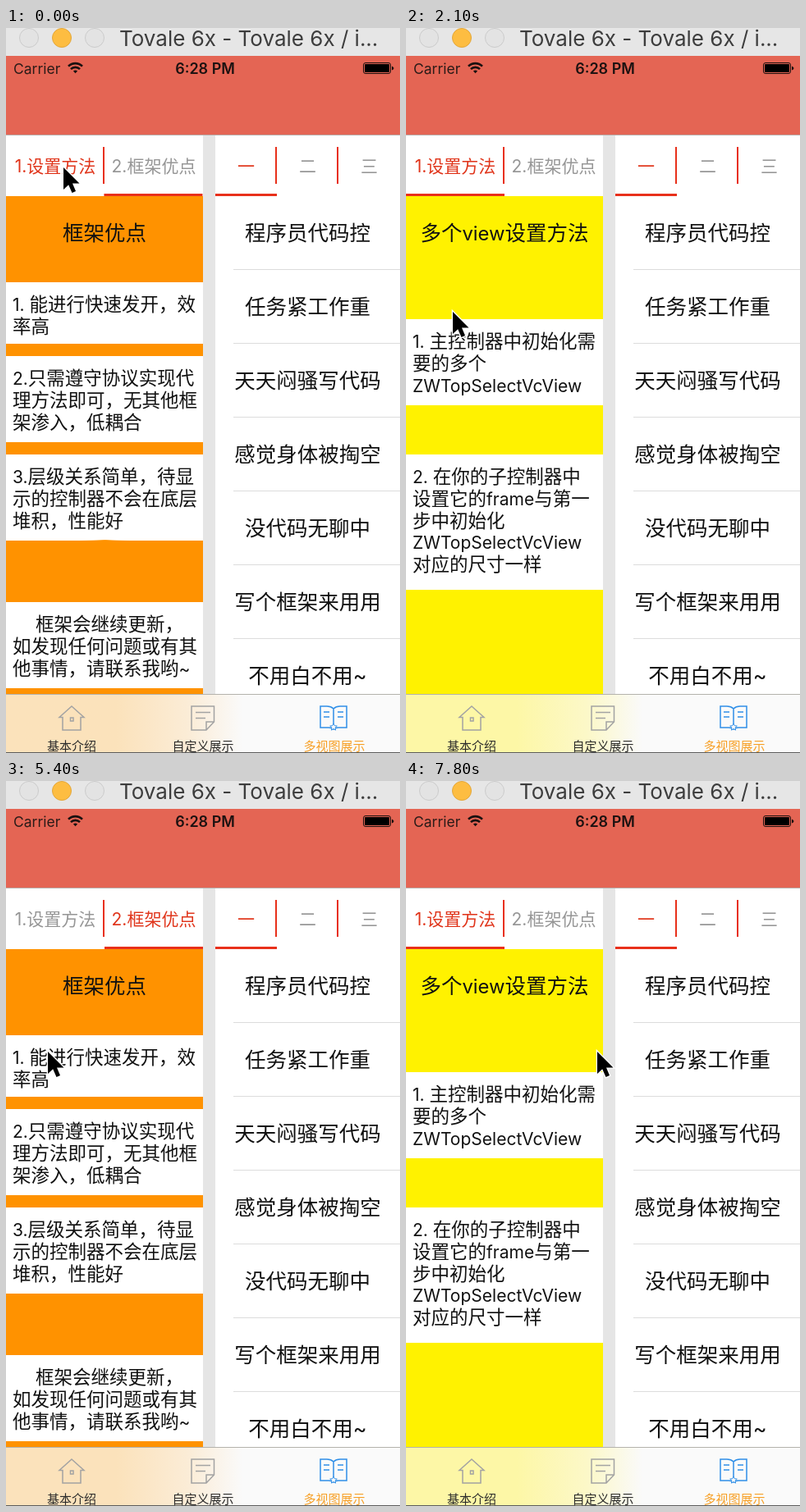
These frames come from a looping animation (480x884 px, 8 s). An HTML page with a canvas:

```html
<!DOCTYPE html>
<html lang="zh-CN">
<head>
<meta charset="utf-8">
<title>多视图展示</title>
<style>
html, body { margin: 0; width: 100%; height: 100%; overflow: hidden; background: #e5e5e5; }
svg, canvas { position: absolute; left: 0; top: 0; display: block; }
canvas { top: 205px; }
text { font-family: Inter, "Noto Sans CJK SC", "Noto Sans CJK JP", "Noto Sans CJK", sans-serif; white-space: pre; }
.mid { text-anchor: middle; }
.tab { font-size: 21px; fill: #969696; }
.tab.on { fill: #e0351b; }
.row { font-size: 25.5px; fill: #111; }
.label { font-size: 15px; fill: #2a2a2a; }
.red { fill: #e8301a; }
.icon { fill: none; stroke: #a3a3a3; stroke-width: 1.5; }
</style>
</head>
<body>
<svg width="480" height="884" viewBox="0 0 480 884">
  <!-- window title -->
  <rect width="480" height="34" fill="#e6e6e6"/>
  <g stroke-width="1" fill="#e3e3e3" stroke="#cbcbcb">
    <circle cx="28" cy="12" r="11.5"/>
    <circle cx="68" cy="12" r="11.5" fill="#fdbd41" stroke="#e3a73a"/>
    <circle cx="108" cy="12" r="11.5"/>
  </g>
  <text x="138" y="22" font-size="26" fill="#3d3d3d">Tovale 6x - Tovale 6x / i...</text>

  <!-- status and navigation bar -->
  <rect y="34" width="480" height="96" fill="#e46554"/>
  <rect y="130" width="480" height="1" fill="#b9aeac"/>
  <text x="9" y="56" font-size="17.5" fill="#2b1b18">Carrier</text>
  <g fill="none" stroke="#1a1110" stroke-width="2.6">
    <path d="M76 46.7a12 12 0 0 1 17 0M79 50.2a7.6 7.6 0 0 1 11 0"/>
    <path d="M81.9 52.6l2.6 2.6 2.6-2.6a4 4 0 0 0-5.2 0z" fill="#1a1110" stroke="none"/>
  </g>
  <text class="mid" x="242.5" y="56" font-size="18" font-weight="600" fill="#1d1211">6:28 PM</text>
  <rect x="435.5" y="42.5" width="33" height="13" rx="2.5" fill="none" stroke="#1a0f0e"/>
  <rect x="437" y="44" width="30" height="10" rx="1" fill="#000"/>
  <path d="M470 46.5q2.5 1 2.5 2.5t-2.5 2.5z" fill="#1a0f0e"/>

  <!-- left tabs -->
  <rect y="131" width="240" height="74" fill="#fff"/>
  <text class="tab mid" x="60" y="175.5">1.设置方法</text>
  <text class="tab mid" x="180" y="175.5">2.框架优点</text>
  <rect class="red" x="118" y="145" width="2" height="45"/>
  <rect class="red" id="line" y="202" width="120" height="3"/>

  <!-- right panel -->
  <rect x="255" y="131" width="225" height="681" fill="#fff"/>
  <text class="tab on mid" x="292.5" y="175.5">一</text>
  <text class="tab mid" x="367.5" y="175.5">二</text>
  <text class="tab mid" x="442.5" y="175.5">三</text>
  <rect class="red" x="328" y="145" width="2" height="45"/>
  <rect class="red" x="403" y="145" width="2" height="45"/>
  <rect class="red" x="255" y="202" width="75" height="3"/>
  <g id="list"></g>
</svg>

<canvas id="page" width="240" height="607"></canvas>

<svg width="480" height="884" viewBox="0 0 480 884">
  <defs>
    <linearGradient id="warm">
      <stop offset=".28" stop-color="#fbe2bb"/><stop offset=".46" stop-color="#fbecd6"/><stop offset=".6" stop-color="#fafafa"/>
    </linearGradient>
    <linearGradient id="sun">
      <stop offset=".28" stop-color="#fdf7a6"/><stop offset=".46" stop-color="#fcf8c8"/><stop offset=".6" stop-color="#fafafa"/>
    </linearGradient>
  </defs>
  <!-- tab bar -->
  <rect y="812" width="480" height="72" fill="url(#sun)"/>
  <rect id="tint" y="812" width="480" height="72" fill="url(#warm)"/>
  <rect y="812" width="480" height="1" fill="#b4b2ac"/>
  <rect y="883" width="480" height="1" fill="#5c5c5c"/>
  <g class="icon">
    <path d="M80 827L95 840.5H91V856H69V840.5H65Z"/>
    <rect x="78.5" y="841" width="3.5" height="4"/>
    <path d="M226 827H253.500V846L244 856H226ZM253.500 846H244V856M231 834.500H249M231 841.500H243"/>
  </g>
  <g class="icon" style="stroke:#2f8fe8">
    <path d="M399 830Q396 827 391 827H383V853H393Q397 853 399 855Q401 853 405 853H415V827H407Q402 827 399 830V849"/>
    <path d="M387 834H394M387 840H394M404 834H411M404 840H411"/>
    <path d="M399 848l1.300 2.700 3 .4-2.200 2 .5 3-2.600-1.500-2.600 1.500.5-3-2.200-2 3-.4z" fill="#fafafa" stroke-width="1"/>
  </g>
  <text class="label mid" x="80" y="880.500">基本介绍</text>
  <text class="label mid" x="240" y="880.500">自定义展示</text>
  <text class="label mid" x="400" y="880.500" style="fill:#f7a026">多视图展示</text>
  <path id="cursor" d="M0 0V27L6.200 21.200 10.500 31 15 29 11 19.500H19.500Z" fill="#000" stroke="#fff" stroke-width="2.600" paint-order="stroke"/>
</svg>

<script>
const LOOP = 8000, STEP = 300, TOP = 205, W = 240, H = 607;
const CJK = '"Noto Sans CJK SC", "Noto Sans CJK JP", "Noto Sans CJK", sans-serif';
const $ = id => document.getElementById(id);
const ease = p => { p = Math.min(1, Math.max(0, p)); return p * p * (3 - 2 * p); };

// Right-hand list
const rows = ['程序员代码控', '任务紧工作重', '天天闷骚写代码', '感觉身体被掏空', '没代码无聊中', '写个框架来用用', '不用白不用~'];
$('list').innerHTML = rows.map((s, i) =>
  `<text class="row mid" x="367.5" y="${259 + i * 90}">${s}</text>` +
  (i < 6 ? `<rect x="277" y="${294 + i * 90}" width="203" height="1" fill="#dcdcdc"/>` : '')).join('');

// Pages: boxes are [top, bottom], lines are [centre y, text, x]
const pages = [
  {
    color: '#fff200', title: '多个view设置方法',
    boxes: [[355, 460], [520, 685]],
    lines: [[381, '1. 主控制器中初始化需'], [408, '要的多个'], [435, 'ZWTopSelectVcView'],
      [546, '2. 在你的子控制器中'], [573, '设置它的frame与第一'], [600, '步中初始化'],
      [626, 'ZWTopSelectVcView'], [653, '对应的尺寸一样']]
  },
  {
    color: '#ff9200', title: '框架优点',
    boxes: [[310, 385], [400, 505], [520, 625], [700, 805]],
    lines: [[336, '1. 能进行快速发开，效'], [363, '率高'],
      [426, '2.只需遵守协议实现代'], [453, '理方法即可，无其他框'], [480, '架渗入，低耦合'],
      [546, '3.层级关系简单，待显'], [573, '示的控制器不会在底层'], [600, '堆积，性能好'],
      [726, '框架会继续更新，', 36], [753, '如发现任何问题或有其'], [780, '他事情，请联系我哟~']]
  }
];

function makeCanvas() {
  const c = document.createElement('canvas');
  c.width = W; c.height = H;
  return c;
}

// Latin runs are set a little smaller than the Chinese ones
function write(g, text, size, x, y, centred) {
  const runs = text.match(/[\x20-\x7e]+|[^\x20-\x7e]+/g).map(s => {
    const latin = s.charCodeAt(0) < 127;
    const font = latin ? `${size * 0.935}px Inter, sans-serif` : `${size}px ${CJK}`;
    g.font = font;
    return { s, font, w: g.measureText(s).width };
  });
  if (centred) x -= runs.reduce((n, r) => n + r.w, 0) / 2;
  for (const r of runs) {
    g.font = r.font;
    g.fillText(r.s, x, y + size * 0.38);
    x += r.w;
  }
}

function drawPage({ color, title, boxes, lines }) {
  const c = makeCanvas(), g = c.getContext('2d');
  g.translate(0, -TOP);
  g.fillStyle = color;
  g.fillRect(0, TOP, W, H);
  g.fillStyle = '#fff';
  for (const [a, b] of boxes) g.fillRect(0, a, W, b - a);
  g.fillStyle = '#111';
  write(g, title, 25.5, 120, 249.5, true);
  for (const [y, s, x = 8] of lines) write(g, s, 22.5, x, y);
  return c;
}

const sheets = pages.map(drawPage);
const view = $('page').getContext('2d');
const mix = makeCanvas().getContext('2d', { willReadFrequently: true });

// Radial shift of the water ring at distance u behind its front
function ring(u) {
  if (u <= 0 || u >= 199) return 0;
  return u < 59 ? 5 * Math.sin(Math.PI * u / 59)
    : -17 * Math.sin(Math.PI * ((u - 59) / 140) ** 0.63);
}

function ripple(front, amp) {
  const src = mix.getImageData(0, 0, W, H).data;
  const out = view.createImageData(W, H), dst = out.data;
  const cx = 120, cy = 426;
  for (let y = 0, i = 0; y < H; y++) for (let x = 0; x < W; x++, i += 4) {
    const dx = x - cx, dy = y - cy, r = Math.hypot(dx, dy) || 1;
    const k = 1 - amp * ring(front - r) / r;
    const sx = Math.min(W - 1.01, Math.max(0, cx + dx * k));
    const sy = Math.min(H - 1.01, Math.max(0, cy + dy * k));
    const x0 = sx | 0, y0 = sy | 0, fx = sx - x0, fy = sy - y0;
    const j = (y0 * W + x0) * 4, d = j + W * 4;
    for (let n = 0; n < 3; n++) {
      const a = src[j + n] + (src[j + 4 + n] - src[j + n]) * fx;
      const b = src[d + n] + (src[d + 4 + n] - src[d + n]) * fx;
      dst[i + n] = a + (b - a) * fy;
    }
    dst[i + 3] = 255;
  }
  view.putImageData(out, 0, 0);
}

// [start time, page shown next]
const switches = [[-20, 0], [4372, 1], [6270, 0]];
// [time, x, y] of the pointer
const track = [[0, 70, 170], [300, 70, 171], [1200, 57, 346], [2100, 57, 346], [3300, 173, 323],
  [3900, 176, 325], [4500, 51, 330], [5700, 51, 330], [6300, 233, 330], [LOOP, 233, 330]];

function pointer(t) {
  const i = track.findIndex(k => k[0] > t);
  const a = track[i - 1], b = track[i];
  const p = ease((t - a[0]) / (b[0] - a[0]));
  return [a[1] + (b[1] - a[1]) * p, a[2] + (b[2] - a[2]) * p];
}

const tabs = [...document.querySelectorAll('.tab')].slice(0, 2);

function render(t) {
  const [start, to] = switches.filter(s => s[0] <= t).pop();
  const age = t - start, p = Math.min(1, age / 800), fade = ease(p);
  const slide = ease(age / 500);

  tabs.forEach((el, i) => el.classList.toggle('on', i === to));
  $('line').setAttribute('x', 120 * (to ? slide : 1 - slide));
  $('tint').setAttribute('opacity', to ? fade : 1 - fade);
  $('cursor').setAttribute('transform', `translate(${pointer(t)})`);

  if (p === 1) {
    view.drawImage(sheets[to], 0, 0);
    return;
  }
  mix.globalAlpha = 1;
  mix.drawImage(sheets[1 - to], 0, 0);
  mix.globalAlpha = fade;
  mix.drawImage(sheets[to], 0, 0);
  const front = age * 1.56;
  ripple(front, 1.19 * (1 - p) * Math.min(1, front / 200));
}

let last = -1;
function tick() {
  const t = Math.floor(performance.now() % LOOP / STEP) * STEP;
  if (t !== last) render(last = t);
  requestAnimationFrame(tick);
}
tick();
</script>
</body>
</html>
```
